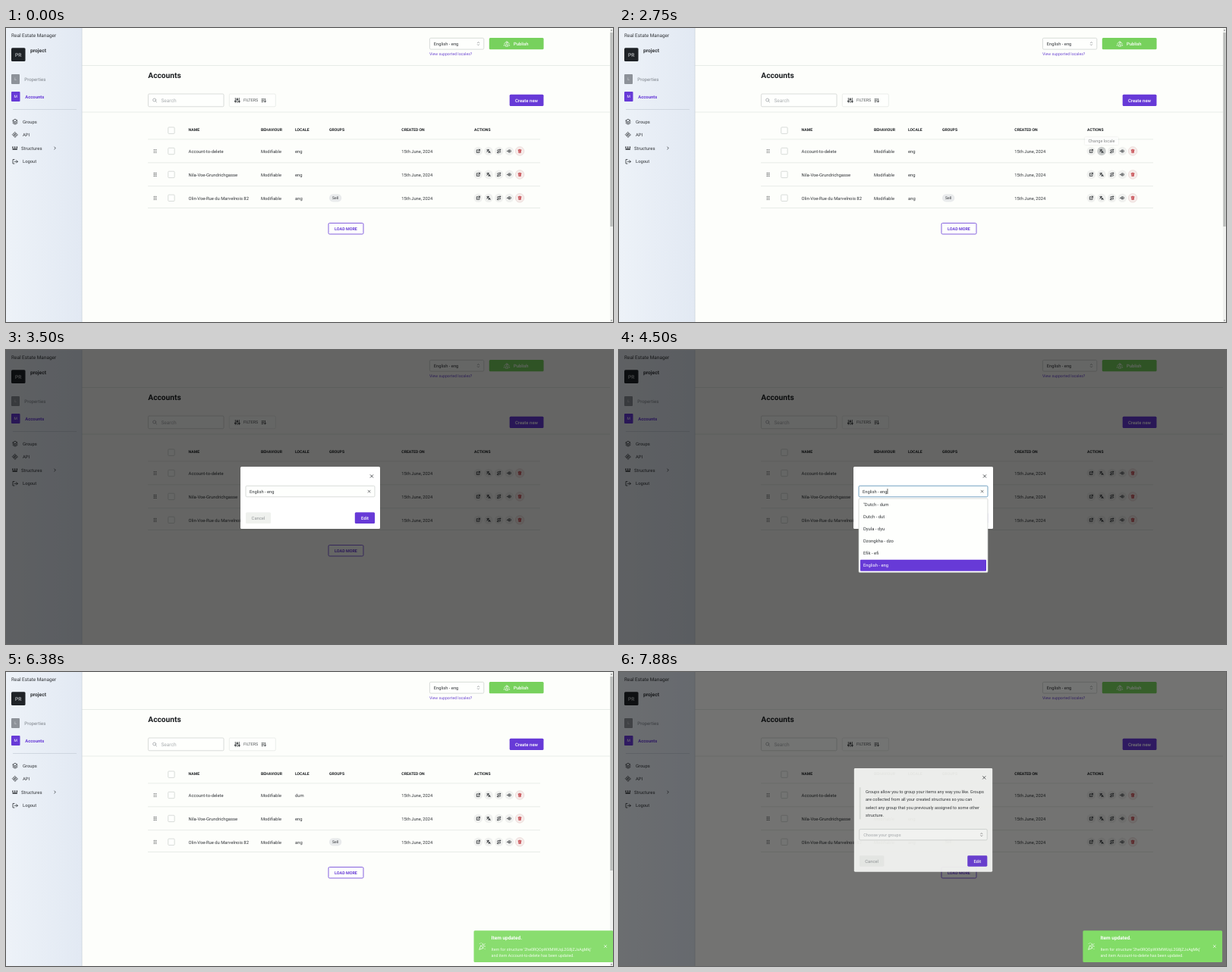
These frames come from a looping animation (800x388 px, 8000 ms). An HTML page:

```html
<!DOCTYPE html>
<html lang="en">
<head>
<meta charset="utf-8">
<title>Accounts</title>
<style>
  html, body { margin: 0; width: 100%; height: 100%; overflow: hidden; background: #fdfefb; }
  svg { display: block; width: 100vw; height: 100vh; }
  text { font: 5.85px Roboto, Arial, sans-serif; fill: #33363a; white-space: pre; text-rendering: geometricPrecision; }
  .b { font-weight: 700; }
  .m { font-weight: 500; }
  .mid { text-anchor: middle; }
  .head text { font-size: 5.1px; font-weight: 700; fill: #1d2023; }
  .white { fill: #fff; }
  .grey { fill: #a9adb0; }
  .violet { fill: #673ad7; }
  .green { fill: #77d15d; }
  .ink { fill: none; stroke: #25282c; stroke-width: .75; stroke-linecap: round; stroke-linejoin: round; }
  .box { fill: #fefffd; stroke: #c9cdca; stroke-width: .7; }
  .rule { stroke: #e3e7e2; stroke-width: .8; }
  .disc { fill: #f0f1ef; }
  .disc.on { fill: #c9cccb; }
  .del { stroke: #c0393f; }
  .tip rect { fill: #fff; filter: drop-shadow(0 .4px .8px #0003); }
  .toast text { font-size: 5.35px; fill: #f1fdec; }
  .status { font: 5.2px "Noto Sans", sans-serif; fill: #f4f4f4; }
</style>
</head>
<body>
<svg viewBox="0 0 800 388" preserveAspectRatio="none">
  <defs>
    <linearGradient id="side"><stop stop-color="#edf2f8"/><stop offset="1" stop-color="#e2e9f3"/></linearGradient>
    <path id="edit" d="M-.3-1.6H-2V2H1.6V.3M-.6.6 2.2-2.2M.6-2.2H2.2V-.6"/>
    <path id="lang" d="M-2.2-1.6H.6M-.8-2.2V-1.6M.1-1.6Q-.5.2-2.2.8M-1.4-.6Q-.6.6.1.8M0 2.2 1.1-.2 2.2 2.2M.4 1.5H1.8"/>
    <path id="link" d="M2.2-1.8H-1Q-2-1.8-2-.9T-1 0H1Q2 0 2 .9T1 1.8H-2.2M1.4-2.5 2.3-1.8 1.4-1.1M-1.4 1.1-2.3 1.8-1.4 2.5"/>
    <path id="eye" d="M-2.6 0Q0-3.4 2.6 0Q0 3.4-2.6 0ZM-.6 0A.6.6 0 1 0 .6 0A.6.6 0 1 0-.6 0"/>
    <path id="bin" d="M-2-1.4H2M-1.5-1.4-1.3 2.2H1.3L1.5-1.4M-.7-1.4V-2.2H.7V-1.4M-.4-.3V1.2M.4-.3V1.2"/>
    <path id="x" d="M-1.8-1.8 1.8 1.8M1.8-1.8-1.8 1.8"/>
    <path id="updown" d="M-1.1-1 0-2.2 1.1-1M-1.1 1 0 2.2 1.1 1"/>
  </defs>

  <rect width="800" height="388" fill="#fdfefb"/>
  <path class="rule" d="M100 49.5H796M100 111H796"/>

  <!-- sidebar -->
  <rect width="100" height="388" fill="url(#side)"/>
  <path d="M100 0V388" stroke="#ccd3dd" stroke-width=".8"/>
  <text x="7" y="12.3" style="font-size:6.45px">Real Estate Manager</text>
  <rect x="7" y="26.3" width="18.5" height="17.6" rx="1.5" fill="#1f2327"/>
  <text class="mid" x="16.2" y="37.8" style="font-size:6.6px;fill:#dfe2e5">PR</text>
  <text class="b" x="32" y="32.3" style="font-size:6.7px">project</text>
  <rect x="7" y="61" width="11" height="13" rx="1" fill="#8d9299"/>
  <text class="mid" x="12.5" y="69.3" style="font-size:5px;fill:#d9dce0">L</text>
  <text x="24.3" y="69.7" style="font-size:6.1px;fill:#7e848b">Properties</text>
  <rect class="violet" x="7" y="84" width="11.5" height="13" rx="1"/>
  <text class="mid white" x="12.8" y="92.3" style="font-size:5px">M</text>
  <text class="b violet" x="25.3" y="92.8">Accounts</text>
  <path d="M9 107.5H93" stroke="#c9d1db" stroke-width=".8"/>
  <g class="ink">
    <path d="M9 122 12 120.3 15 122 12 123.7ZM9 123.8 12 125.5 15 123.8M9 125.5 12 127.2 15 125.5"/>
    <path d="M12 137.6 13.3 139 12 140.3 10.7 139ZM12 141.7 13.3 143 12 144.4 10.7 143ZM9.9 139.7 11.2 141 9.9 142.3 8.6 141ZM14.1 139.7 15.4 141 14.1 142.3 12.8 141Z"/>
    <path d="M9 157V158.2M11.7 157V158.2M14.4 157V158.2M9 160H14.4" stroke-width="1.3"/>
    <path d="M63.8 157 65.3 158.5 63.8 160"/>
    <path d="M11 173.5H9V179H11M11.3 176.3H15.3M13.7 174.6 15.4 176.3 13.7 178"/>
  </g>
  <text x="22" y="125.5">Groups</text>
  <text x="22" y="143.2">API</text>
  <text x="20" y="160.8" style="font-size:6px">Structures</text>
  <text x="22" y="178.4">Logout</text>

  <!-- top bar -->
  <rect class="box" x="558.4" y="13.3" width="71.4" height="14.8" rx="1.5"/>
  <text x="563.8" y="23" style="font-size:5.75px">English - eng</text>
  <use href="#updown" class="ink" x="622.5" y="20.7" style="stroke:#8a8e90"/>
  <text x="558" y="35.6" style="font-size:5.2px;fill:#6d48d2">View supported locales?</text>
  <rect class="green" x="636.8" y="13" width="71.8" height="15.2" rx="1.5"/>
  <g class="ink" style="stroke:#fff">
    <circle cx="660" cy="19" r="1.2"/><path d="M658.3 23.7V22.4Q660 20.6 661.7 22.4V23.7ZM657.4 19.6Q656.3 20.2 657.2 21.3M656.4 23.3V22.4M662.6 19.6Q663.7 20.2 662.8 21.3M663.6 23.3V22.4"/>
  </g>
  <text class="m white" x="669" y="22.8">Publish</text>

  <!-- toolbar -->
  <text class="b" x="187.3" y="65.6" style="font-size:10.2px;fill:#1b1e21">Accounts</text>
  <rect class="box" x="187.4" y="87" width="99.6" height="16.8" rx="1.5"/>
  <g class="ink" style="stroke:#9ca0a3"><circle cx="195.6" cy="95" r="2"/><path d="M197.1 96.5 198.6 98"/></g>
  <text class="grey" x="204.5" y="97.7" style="font-size:6.5px">Search</text>
  <rect class="box" x="294.3" y="87" width="61" height="16.8" rx="1.5" style="stroke:#e3e6e2"/>
  <g class="ink">
    <path d="M302.3 92.5V98.5M304.8 92.5V98.5M307.3 92.5V98.5"/>
    <path d="M301.5 96.6H303.1M304 94.2H305.6M306.5 96.9H308.1" stroke-width="1.3"/>
    <path d="M337 93.8H340M337 95.6H339.4M337 97.4H338.8M341.4 93.3V97.8M340.2 96.6 341.4 97.9 342.6 96.6"/>
  </g>
  <text x="313" y="97.4" style="font-size:5.35px;fill:#54585c">FILTERS</text>
  <rect class="violet" x="663.7" y="87.8" width="44.8" height="15.2" rx="1.5"/>
  <text class="m white mid" x="686" y="97.6" style="font-size:6px">Create new</text>

  <g id="table"></g>
  <rect class="box" x="425" y="257.5" width="46" height="14.5" rx="1.5" style="stroke:#7650db;stroke-width:.9"/>
  <text class="b violet mid" x="448" y="266.8" style="font-size:5.4px">LOAD MORE</text>

  <g id="bar">
    <rect x="796" width="4" height="388" fill="#f0f1ef"/>
    <rect x="796.3" y="6" width="3.4" height="256" fill="#bcbebc"/>
    <path d="M796.9 3.6 798 2 799.1 3.6ZM796.9 385.4 798 387 799.1 385.4Z" fill="#606260"/>
  </g>
  <g id="status">
    <path d="M0 380.5H265.5Q267 380.5 267 382V388H0Z" fill="#2b2d2f"/>
    <text class="status" x="1.8" y="386.6">localhost:5173/dashboard/2he0RPbCa92vbBoVHp8ihNGlUdW/map/.../2hv1Wpqi8Ng7aZIPFEb6o54izK9</text>
  </g>

  <rect id="shade" width="800" height="388"/>

  <g id="localeBox">
    <rect x="309" y="154" width="184" height="82" rx="1.5" class="white"/>
    <use href="#x" class="ink" x="482" y="166.5"/>
    <rect id="field" class="box" x="316" y="179.3" width="170" height="14.5" rx="1.5"/>
    <text id="value" x="321" y="188.7" style="font-size:5.75px"></text>
    <path id="spell" d="M342.5 190H353.3" stroke="#555" stroke-width=".6"/>
    <path id="caret" d="M353.9 183V190" stroke="#222" stroke-width=".7"/>
    <use href="#x" class="ink" transform="translate(478.6 186.6) scale(.8)"/>
    <g class="buttons"></g>
    <g id="list"></g>
  </g>

  <g id="groupBox">
    <rect x="309" y="126" width="184" height="138" rx="1.5" fill="#f9faf7"/>
    <use href="#x" class="ink" x="482" y="138.5"/>
    <rect x="316" y="151.5" width="1.8" height="42.5" fill="#dfe2de"/>
    <g id="note"></g>
    <rect class="box" x="316" y="207.2" width="170" height="14.5" rx="1.5"/>
    <text class="grey" x="321.5" y="216.6" style="font-size:5.6px">Choose your groups</text>
    <use href="#updown" class="ink" x="478.5" y="214.5" style="stroke:#777"/>
    <g class="buttons" transform="translate(0 28)"></g>
  </g>

  <g id="tipLocale" class="tip">
    <rect x="614" y="144.2" width="44" height="10" rx="1"/>
    <text class="mid" x="636" y="151.4" style="font-size:5.6px">Change locale</text>
  </g>
  <g id="tipView" class="tip">
    <rect x="646.5" y="144.2" width="34" height="10" rx="1"/>
    <text class="mid" x="663.5" y="151.4" style="font-size:5.7px">View item</text>
  </g>

  <g id="toast" class="toast">
    <rect x="605" y="341.3" width="183.7" height="41.7" rx="1.5" fill="#82dc67"/>
    <g class="ink" style="stroke:#fff">
      <path d="M612.3 366 614.2 360.8 617.4 364ZM616.3 360.8Q617.6 360 616.7 358.3M617.5 362.2Q618.6 361.2 620 362M617.2 361 619.6 358.6M612.8 358.3V358.4M619.6 365.6V365.7M614.6 357.6V357.7"/>
      <use href="#x" transform="translate(778.5 362) scale(.85)"/>
    </g>
    <text class="b" x="628" y="352.5" style="font-size:6.5px;fill:#fff">Item updated.</text>
    <text x="628" y="368">Item for structure '2he0RQOpWXMWUqL2G8jZJxAgMkj'</text>
    <text x="628" y="376.2">and item Account-to-delete has been updated.</text>
  </g>
</svg>
<script>
const $ = id => document.getElementById(id);
const text = (x, y, s, attrs = '') => `<text x="${x}" y="${y}" ${attrs}>${s}</text>`;
const check = y => `<rect class="box" x="213.7" y="${y - 4.2}" width="8.4" height="8.4" rx="1"/>`;

const heads = { NAME: 240.6, BEHAVIOUR: 336, LOCALE: 381, GROUPS: 426, 'CREATED ON': 521.3, ACTIONS: 617 };
const rows = [
  ['Account-to-delete', 'eng', 162.5],
  ['Nila-Voe-Grundrichgasse', 'eng', 193.4],
  ['Olin-Voe-Rue du Marvelnois 82', 'ang', 224.3],
];
const icons = ['edit', 'lang', 'link', 'eye', 'bin'];

const action = (name, i, y) => {
  const x = 622.3 + i * 13.7, del = name === 'bin';
  return `<circle class="disc" cx="${x}" cy="${y}" r="5.8" ${del ? 'style="fill:#f6ecea;stroke:#e5cfcd;stroke-width:.6"' : ''}/>
    <use href="#${name}" class="ink ${del ? 'del' : ''}" x="${x}" y="${y}"/>`;
};

const row = ([name, locale, y]) => {
  const base = y + 2.2;
  const dots = [-2, 0, 2].map(d => `M195.3 ${y + d}h.01M197.7 ${y + d}h.01`).join('');
  return `<path class="rule" d="M187 ${y - 15.6}H704"/>
    <path class="ink" d="${dots}" style="stroke-width:1.2"/>` + check(y) +
    text(240.6, base, name) + text(336, base, 'Modifiable', 'style="font-size:5.75px"') +
    text(381, base, locale, 'class="locale"') +
    text(521.3, base, '15th June, 2024', 'style="font-size:5.75px"') +
    icons.map((n, i) => action(n, i, y)).join('');
};

$('table').innerHTML = check(135.2) +
  `<g class="head">${Object.entries(heads).map(([s, x]) => text(x, 135.8, s)).join('')}</g>` +
  rows.map(row).join('') +
  '<path class="rule" d="M187 237.5H704"/><rect x="426" y="219.2" width="16.3" height="10.3" rx="5" fill="#e9ebec"/>' +
  text(434.1, 226.2, 'Sell', 'class="mid" style="font-size:5px"');

document.querySelectorAll('.buttons').forEach(g => g.innerHTML =
  '<rect x="316" y="214.2" width="33" height="14.8" rx="1.5" fill="#eff1ee"/>' +
  text(332.5, 223.8, 'Cancel', 'class="mid" style="fill:#94989a"') +
  '<rect class="violet" x="459.8" y="214.2" width="26.3" height="14.8" rx="1.5"/>' +
  text(473, 223.8, 'Edit', 'class="m white mid"'));

$('note').innerHTML = [
  'Groups allow you to group your items any way you like. Groups',
  'are collected from all your created structures so you can',
  'select any group that you previously assigned to some other',
  'structure.',
].map((s, i) => text(324.3, 158.9 + i * 10.65, s, 'style="font-size:5.7px"')).join('');

const options = ['"Dutch - dum', 'Dutch - dut', 'Dyula - dyu', 'Dzongkha - dzo', 'Efik - efi', 'English - eng'];
$('list').innerHTML = '<rect class="box" x="316" y="196" width="170" height="97.6" rx="1.5"/>' +
  '<rect class="violet" x="318" y="276.8" width="166" height="15" rx="1"/>' +
  options.map((s, i) => text(322, 206.2 + i * 16, s, i === 5 ? 'class="white"' : '')).join('');

// cubic-bezier(.25, .1, .25, 1)
const ease = x => {
  let lo = 0, hi = 1, u = .5;
  for (let i = 0; i < 20; i++, u = (lo + hi) / 2) {
    const v = 1 - u;
    if (.75 * u * v * v + .75 * u * u * v + u ** 3 < x) lo = u; else hi = u;
  }
  const v = 1 - u;
  return .3 * u * v * v + 3 * u * u * v + u ** 3;
};
const ramp = (t, from, ms) => t <= from ? 0 : t >= from + ms ? 1 : ease((t - from) / ms);
const within = (t, a, b) => t >= a && t < b;
const fade = (el, o) => { el.style.display = o > 0 ? '' : 'none'; el.style.opacity = o; };
const pop = (el, p) => {
  fade(el, p);
  el.setAttribute('transform', `translate(401 195) scale(${.9 + .1 * p}) translate(-401 ${4.2 * (1 - p) - 195})`);
};

const LOOP = 8000, STEP = 125;
const discs = document.querySelectorAll('.disc');
const locale = document.querySelector('.locale');
const editButton = document.querySelector('#localeBox .buttons .violet');

function draw(t) {
  const first = ramp(t, 3216, 200) - ramp(t, 6100, 200);
  const second = ramp(t, 7747, 200);
  const open = first + second;
  pop($('localeBox'), first);
  pop($('groupBox'), second);
  fade($('shade'), .6 * open);
  fade($('bar'), open > 0 ? 0 : 1);

  const hover = within(t, 2625, 3300) ? 1 : within(t, 6875, 7375) ? 3 : within(t, 7375, 7800) ? 2 : -1;
  discs.forEach((d, i) => d.classList.toggle('on', i === hover));
  fade($('tipLocale'), ramp(t, 2700, 150) - ramp(t, 3216, 150));
  fade($('tipView'), ramp(t, 6900, 150) - ramp(t, 7350, 150));
  fade($('status'), within(t, 7000, 7500) ? 1 : 0);

  const picked = t >= 5125;
  const focus = t >= 4375;
  $('value').textContent = picked ? options[0] : options[5];
  $('field').style.stroke = focus ? '#3b7cab' : '';
  fade($('spell'), picked ? 1 : 0);
  fade($('caret'), focus && (t - (picked ? 5125 : 4375)) % 1000 < 500 ? 1 : 0);
  fade($('list'), ramp(t, 4340, 150) - ramp(t, 5100, 150));
  editButton.style.fill = within(t, 5875, 6400) ? '#5a30c2' : '';

  locale.textContent = t >= 6250 ? 'dum' : 'eng';
  const shown = ramp(t, 6200, 250);
  fade($('toast'), shown);
  $('toast').setAttribute('transform', `translate(${(1 - shown) * 195 + (open > 0 ? 6.4 : 0)} 0)`);
}

const start = performance.now();
(function tick() {
  const t = (performance.now() - start) % LOOP;
  draw(Math.floor(t / STEP) * STEP);
  requestAnimationFrame(tick);
})();
</script>
</body>
</html>
```
